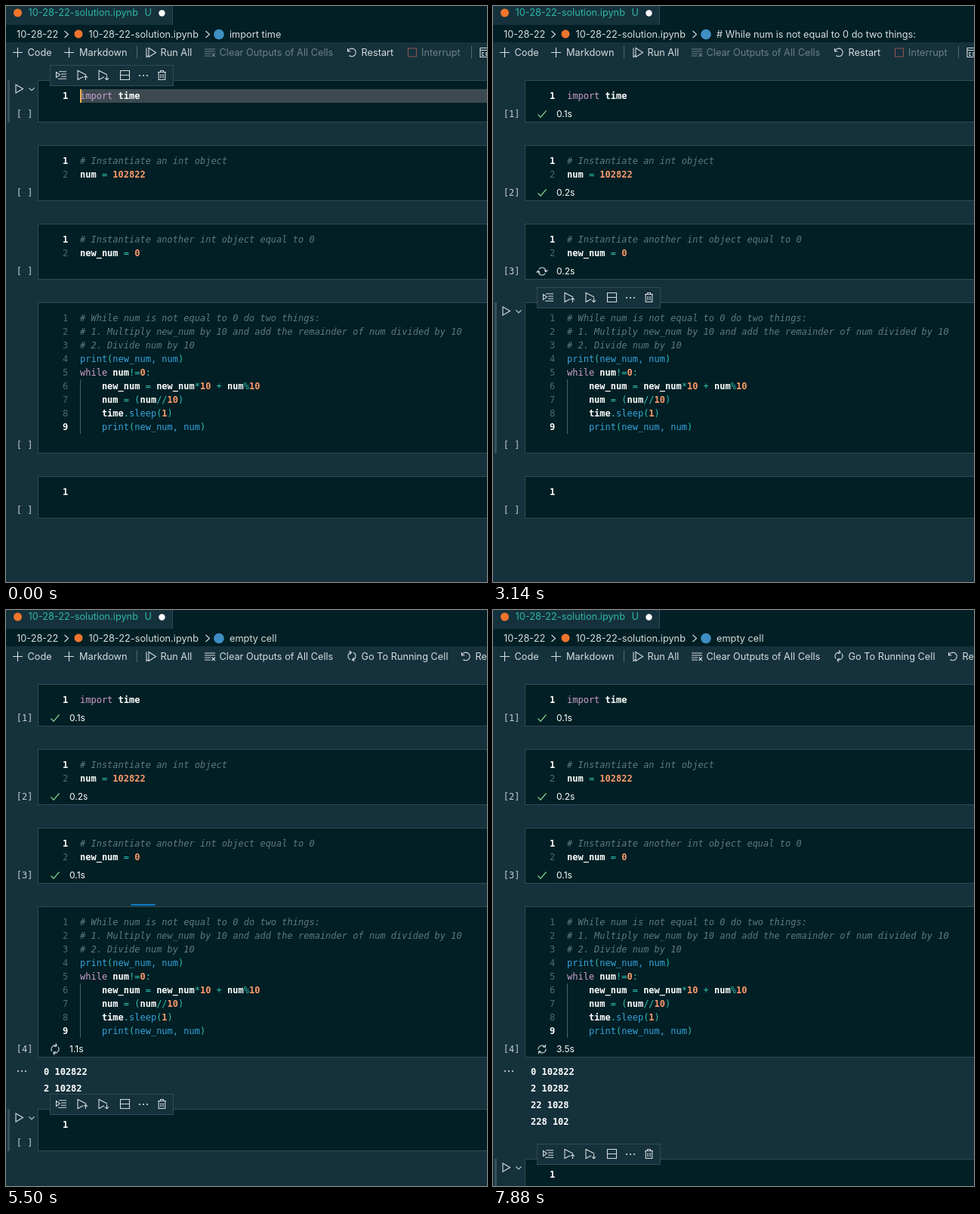
An HTML page with a canvas for the animation above (8 s loop, 637 by 762 pixels).

```html
<!DOCTYPE html>
<html lang="en">
<head>
<meta charset="utf-8">
<title>Notebook run</title>
<style>
html, body { margin: 0; width: 100%; height: 100%; overflow: hidden; background: #15313c; }
canvas { display: block; }
</style>
</head>
<body>
<canvas id="stage" width="637" height="762"></canvas>
<script>
const ctx = document.getElementById('stage').getContext('2d');
const LOOP = 8000, TICK = 148.6, CHAR = 7.224, LINE = 18;
const PAGE = '#15313c', DARK = '#011f24', BORDER = '#304b55';
const TEXT = '#d5dcde', WHITE = '#ffffff', DIM = '#6c8087', TEAL = '#2fb5a8', ORANGE = '#f0752c';
const UI = '12.75px Inter, sans-serif';
const SMALL = '12px Inter, sans-serif';
const MONO = '12px "DejaVu Sans Mono", monospace';

// Token tags: keyword, variable, comment, operator, number, function
const STYLES = {
  k: ['#cf9fd0', ''], v: [WHITE, 'bold '], c: ['#5f797f', 'italic '],
  o: ['#2fc0b2', ''], n: ['#fb9a6c', 'bold '], f: ['#38a3dd', '']
};
const PRINT = '~fprint~o(~fnew_num, num~o)';
const CELLS = [
  { top: 98, height: 56, active: 1, crumb: 'import time', lines: ['~kimport~v time'] },
  { top: 184, height: 74, active: 1, crumb: '# Instantiate an int object',
    lines: ['~c# Instantiate an int object', '~vnum ~o= ~n102822'] },
  { top: 288, height: 74, active: 1, crumb: '# Instantiate another int object equal to 0',
    lines: ['~c# Instantiate another int object equal to 0', '~vnew_num ~o= ~n0'] },
  { top: 392, height: 200, active: 9, crumb: '# While num is not equal to 0 do two things:',
    lines: [
      '~c# While num is not equal to 0 do two things:',
      '~c# 1. Multiply new_num by 10 and add the remainder of num divided by 10',
      '~c# 2. Divide num by 10',
      PRINT,
      '~kwhile ~vnum~o!=~n0~o:',
      '    ~vnew_num ~o= ~vnew_num~o*~n10 ~o+ ~vnum~o%~n10',
      '    ~vnum ~o= (~vnum~o//~n10~o)',
      '    ~vtime~o.~fsleep~o(~n1~o)',
      '    ' + PRINT
    ] },
  { top: 622, height: 56, active: 1, crumb: 'empty cell', lines: [''] }
];
const RUNS = [
  { at: 1050, done: 1500, took: '0.1s' },
  { at: 2250, done: 2690, took: '0.2s' },
  { at: 3140, done: 3720, took: '0.1s' },
  { at: 4320, done: Infinity }
];
const OUTPUT = [
  { text: '0 102822', at: 4620, settled: 4620 },
  { text: '2 10282', at: 5500, settled: 5650 },
  { text: '22 1028', at: 6540, settled: 6540 },
  { text: '228 102', at: 7580, settled: 7580 }
];
const TOOLBAR_AT = 4470, TIMER_START = 4370, PROGRESS_START = 5025;

function rect(x, y, w, h, color) {
  ctx.fillStyle = color;
  ctx.fillRect(x, y, w, h);
}

function box(x, y, w, h, fill) {
  rect(x, y, w, h, fill);
  ctx.strokeStyle = BORDER;
  ctx.lineWidth = 1;
  ctx.strokeRect(x + .5, y + .5, w - 1, h - 1);
}

function text(str, x, y, color = TEXT, font = UI) {
  ctx.font = font;
  ctx.fillStyle = color;
  ctx.fillText(str, x, y);
}

function dot(x, y, r, color) {
  ctx.fillStyle = color;
  ctx.beginPath();
  ctx.arc(x, y, r, 0, 2 * Math.PI);
  ctx.fill();
}

function icon(d, x, y, color = TEXT, width = 1.1, angle = 0) {
  ctx.save();
  ctx.translate(x, y);
  ctx.rotate(angle);
  ctx.strokeStyle = color;
  ctx.lineWidth = width;
  ctx.stroke(new Path2D(d));
  ctx.restore();
}

const PLUS = 'M-6.5 0H6.5M0 -6.5V6.5';
const CHEVRON = 'M-2.5 -4.5L2.5 0 -2.5 4.5';
const PLAY = 'M-4.5 -5.5L5 0 -4.5 5.5Z';
const RUN_ALL = 'M-3 -6L6.5 0 -3 6ZM-6 -6V6L-3 4';
const CLEAR = 'M-7 -4.5H7M-7 -1.5H7M-7 1.5H1M-7 4.5H1M2.5 1L7 5.5M7 1L2.5 5.5';
const RESTART = 'M-5.5 -5.5V-1.5H-1.5M-5 -2A5.3 5.3 0 1 1 -3.5 4';
const SYNC = 'M-4.3 -2.5A5 5 0 0 1 5 0M2.6 -2.2L5 .4 7.4 -2.2M4.3 2.5A5 5 0 0 1 -5 0M-2.6 2.2L-5 -.4 -7.4 2.2';
const CHECK = 'M-5.5 .5L-2 4.2 5.5 -4.5';
const RUN_LINES = 'M-6.5 -4L-1.5 -.5 -6.5 3ZM-3 -4.8H7M0 -1.5H7M0 1.7H7M-4 4.8H7';
const RUN_ABOVE = 'M1 2.2L-6 6V-6L5 -.5M4.5 6.5V.8M2 3.2L4.5 .7 7 3.2';
const RUN_BELOW = 'M1 2.2L-6 6V-6L5 -.5M4.5 .5V6.2M2 3.8L4.5 6.3 7 3.8';
const SPLIT = 'M-6 -6H6V6H-6ZM-6 0H6';
const TRASH = 'M-5.5 -4H5.5M-2 -4V-6H2V-4M-4.3 -4V6H4.3V-4M-1.5 -1.5V4M1.5 -1.5V4';

const spinAngle = elapsed => elapsed / 1500 * 2 * Math.PI;

function ellipsis(x, y) {
  for (const dx of [-5, 0, 5]) dot(x + dx, y, 1.1, TEXT);
}

function drawHeader(crumb) {
  rect(0, 0, 637, 48, DARK);
  rect(0, 0, 220, 25, PAGE);
  rect(220, 0, 1, 25, BORDER);
  dot(15.5, 9, 5.5, ORANGE);
  text('10-28-22-solution.ipynb', 29.5, 13, TEAL);
  text('U', 183.5, 13, TEAL);
  dot(206.5, 9.5, 4.2, WHITE);

  text('10-28-22', 14, 42);
  icon(CHEVRON, 80, 37.5);
  dot(96, 37, 5.5, ORANGE);
  text('10-28-22-solution.ipynb', 109.5, 42);
  icon(CHEVRON, 267, 37.5);
  dot(282, 37.5, 6.8, '#3f8fc4');
  text(crumb, 296, 42);
}

function drawToolbar(running, hasOutput, now) {
  icon(PLUS, 15.5, 61.5);
  text('Code', 28.5, 66);
  icon(PLUS, 83.5, 61.5);
  text('Markdown', 97, 66);
  rect(173, 53, 1, 16, '#53676f');
  icon(RUN_ALL, 192, 61.5);
  text('Run All', 204.5, 66);
  const clearColor = hasOutput ? TEXT : DIM;
  icon(CLEAR, 270, 61.5, clearColor);
  text('Clear Outputs of All Cells', 282.5, 66, clearColor);

  if (running) {
    icon(SYNC, 458, 61, TEXT, 1.1, spinAngle(now - TOOLBAR_AT + 50));
    text('Go To Running Cell', 470.5, 66);
  }
  const shift = running ? 151 : 0;
  icon(RESTART, 458 + shift, 61.5);
  text('Restart', 470.5 + shift, 66);
  if (running) return;
  icon('M-5.5 -5.5H5.5V5.5H-5.5Z', 538, 61.5, '#8b5650');
  text('Interrupt', 550, 66, DIM);
  rect(616, 53, 1, 16, '#53676f');
  icon('M8 -6H-6V6H8M-6 -3H8M-1 0H-3V4H-1M2 0H4V4H2Z', 634, 61.5);
}

function drawCode(line, x, y) {
  const [indent, ...tokens] = line.split('~');
  x += indent.length * CHAR;
  for (const token of tokens) {
    const [color, weight] = STYLES[token[0]];
    const str = token.slice(1);
    text(str, x, y, color, weight + MONO);
    x += str.length * CHAR;
  }
}

function drawStatus(run, bottom, t, now) {
  const y = bottom - 11;
  if (t >= run.done) icon(CHECK, 65, y, '#7cc98c', 1.3);
  else icon(SYNC, 65, y, TEXT, 1.1, spinAngle(now - run.at + 40));
  let label = t < run.at + 140 ? '0.2s' : run.took;
  if (!run.took) label = (Math.max(0, now - TIMER_START) / 1000).toFixed(1) + 's';
  text(label, 84, bottom - 7, WHITE, SMALL);
}

function drawCell(cell, index, top, t, now) {
  const bottom = top + cell.height;
  const run = RUNS[index];
  const started = run && t >= run.at;
  box(42, top, 700, cell.height, DARK);
  if (index === 0 && !started) {
    rect(98, top + 12, 539, LINE, '#3c4a50');
    if (t < 450) rect(98, top + 12, 2, LINE, '#f2b550');
  }
  cell.lines.forEach((line, i) => {
    const y = top + 25 + i * LINE;
    const active = i + 1 === cell.active;
    text(i + 1, 75, y, active ? WHITE : '#4f6a71', (active ? 'bold ' : '') + MONO);
    drawCode(line, 98, y);
    if (line.startsWith(' ')) rect(98, y - 13, 1, LINE, '#49636b');
  });
  text(`[${started ? index + 1 : ' '}]`, 13.7, bottom - 7.5, '#c3cdd0', MONO);
  if (started) drawStatus(run, bottom, t, now);
}

function drawSelection(top, height) {
  rect(2, top, 3, height, '#38505a');
  icon(PLAY, 17.5, top + 11.5);
  icon('M-3.5 -1.7L0 1.8 3.5 -1.7', 34, top + 12);
  box(58, top - 20, 164, 28, PAGE);
  const y = top - 6.5;
  icon(RUN_LINES, 73, y);
  icon(RUN_ABOVE, 101, y);
  icon(RUN_BELOW, 129, y);
  icon(SPLIT, 157.5, y);
  ellipsis(182, y + .5);
  icon(TRASH, 206.5, y);
}

// Indeterminate bar: crosses the cell in 4 s, three times as wide halfway
function drawProgress(now) {
  if (now < PROGRESS_START) return;
  const unit = 21.7;
  const s = (now - PROGRESS_START) / 1000 % 4;
  const center = 42.3 + unit * (.5 + (s < 2 ? 12.5 * s : 25 + 12 * (s - 2)));
  const width = unit * (s < 2 ? 1 + s : 5 - s);
  rect(center - width / 2, 389, width, 2, '#0f7bc4');
}

function draw(t) {
  const now = Math.floor(t / TICK) * TICK;
  const selected = RUNS.filter(run => t >= run.at).length;
  const printed = OUTPUT.filter(line => t >= line.at);
  const rows = OUTPUT.filter(line => t >= line.settled).length;
  const topOf = i => CELLS[i].top + (i === 4 && rows ? 16 + 22 * rows : 0);

  rect(0, 0, 637, 762, PAGE);
  drawHeader(CELLS[selected].crumb);
  drawToolbar(t >= TOOLBAR_AT, printed.length > 0, now);
  CELLS.forEach((cell, i) => drawCell(cell, i, topOf(i), t, now));
  drawProgress(now);
  if (printed.length) ellipsis(21, 610);
  printed.forEach((line, i) => text(line.text, 50, 615 + 22 * i, WHITE, 'bold ' + MONO));
  drawSelection(topOf(selected), CELLS[selected].height);
}

const start = performance.now();
function frame() {
  draw((performance.now() - start) % LOOP);
  requestAnimationFrame(frame);
}
frame();
</script>
</body>
</html>
```
